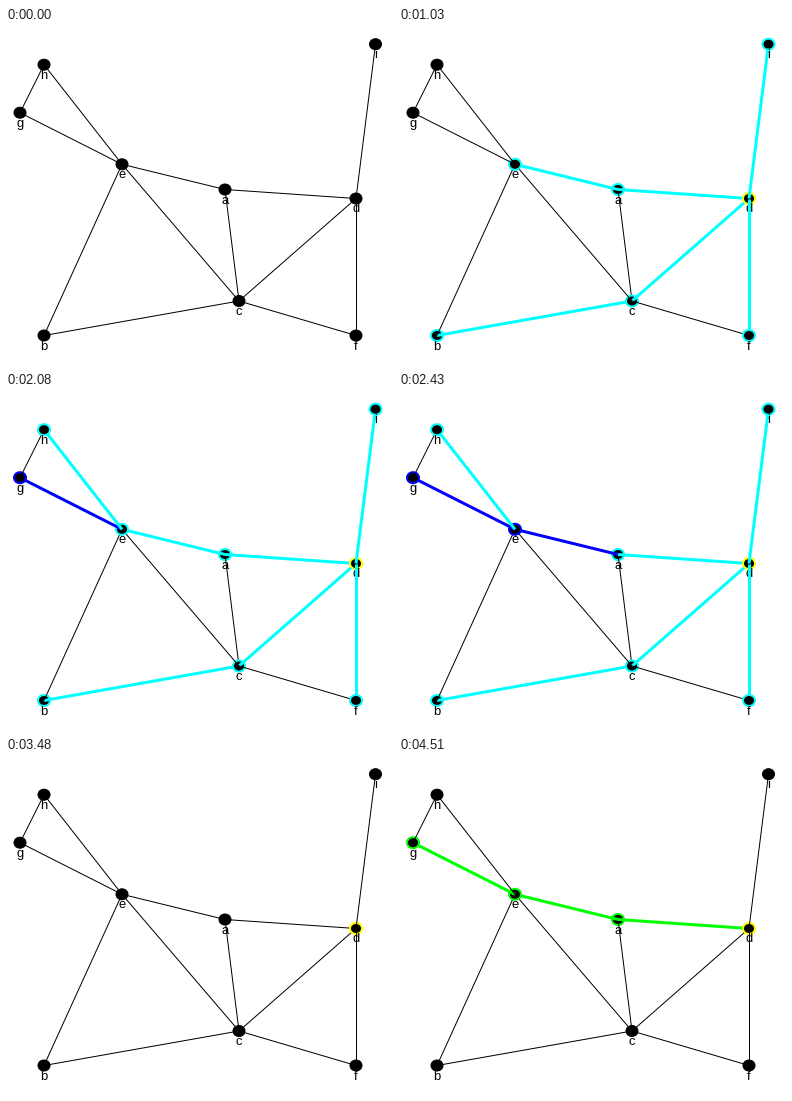
These frames come from a looping animation (387x337 px, 4840 ms). A matplotlib script:

```python
import matplotlib.pyplot as plt
from matplotlib.animation import FuncAnimation
from matplotlib.patches import Ellipse

W, H, DPI = 387, 337, 100
LOOP, STEP = 4840, 10
PX = 72 / DPI  # points per pixel

CYAN, BLUE, GREEN, YELLOW = "#00ffff", "#0000ff", "#00ff00", "#ffff00"

POS = {
    "a": (219, 161.5), "b": (38, 307.5), "c": (233, 273),
    "d": (350, 170.5), "e": (116, 136.3), "f": (350, 307.5),
    "g": (14, 84.7), "h": (38, 36.7), "i": (369.5, 16.2),
}
EDGES = "ac ad ae bc be cd ce cf df di eg eh gh".split()

# Time in ms, colour, and the nodes and edges that take it on.
STEPS = [
    (350, YELLOW, "d"),
    (680, CYAN, "a c f i ad cd df di"),
    (1030, CYAN, "b e ae bc"),
    (1380, CYAN, "g h eg eh"),
    (2080, BLUE, "g eg"),
    (2430, BLUE, "e ae"),
    (2780, BLUE, "a ad"),
    (3130, BLUE, "d"),
    (3480, None, ""),
    (3480, YELLOW, "d"),
    (3830, GREEN, "a ad"),
    (4180, GREEN, "e ae"),
    (4510, GREEN, "g eg"),
]

fig = plt.figure(figsize=(W / DPI, H / DPI), dpi=DPI, facecolor="white")
ax = fig.add_axes([0, 0, 1, 1])
ax.set_xlim(0, W)
ax.set_ylim(H, 0)
ax.axis("off")

nodes, lines = {}, {}


def build():
    """Stack each node, its label, then its edges to later nodes."""
    z = 1
    for name, (x, y) in POS.items():
        nodes[name] = ax.add_patch(Ellipse((x, y), 12, 11, fc="black", zorder=z))
        ax.text(x, y + 14, name, ha="center", va="baseline", color="black",
                family="Liberation Sans", fontsize=13 * PX, zorder=z + 1)
        for edge in EDGES:
            if edge[0] == name:
                xs, ys = zip(POS[edge[0]], POS[edge[1]])
                lines[edge], = ax.plot(xs, ys, solid_capstyle="butt", zorder=z + 2)
        z += 3


def colours_at(t):
    marked = {}
    for start, colour, parts in STEPS:
        if start > t:
            break
        if colour is None:
            marked.clear()
        for part in parts.split():
            marked[part] = colour
    return marked


def draw(i):
    marked = colours_at(i * STEP)
    for name, node in nodes.items():
        node.set_edgecolor(marked.get(name, "black"))
        node.set_linewidth((2 if name in marked else 1) * PX)
    for name, line in lines.items():
        line.set_color(marked.get(name, "black"))
        line.set_linewidth((3 if name in marked else 1) * PX)
    return [*nodes.values(), *lines.values()]


build()
anim = FuncAnimation(fig, draw, frames=LOOP // STEP, interval=STEP,
                     repeat=True, repeat_delay=0, blit=False,
                     cache_frame_data=False)
plt.show()
```
